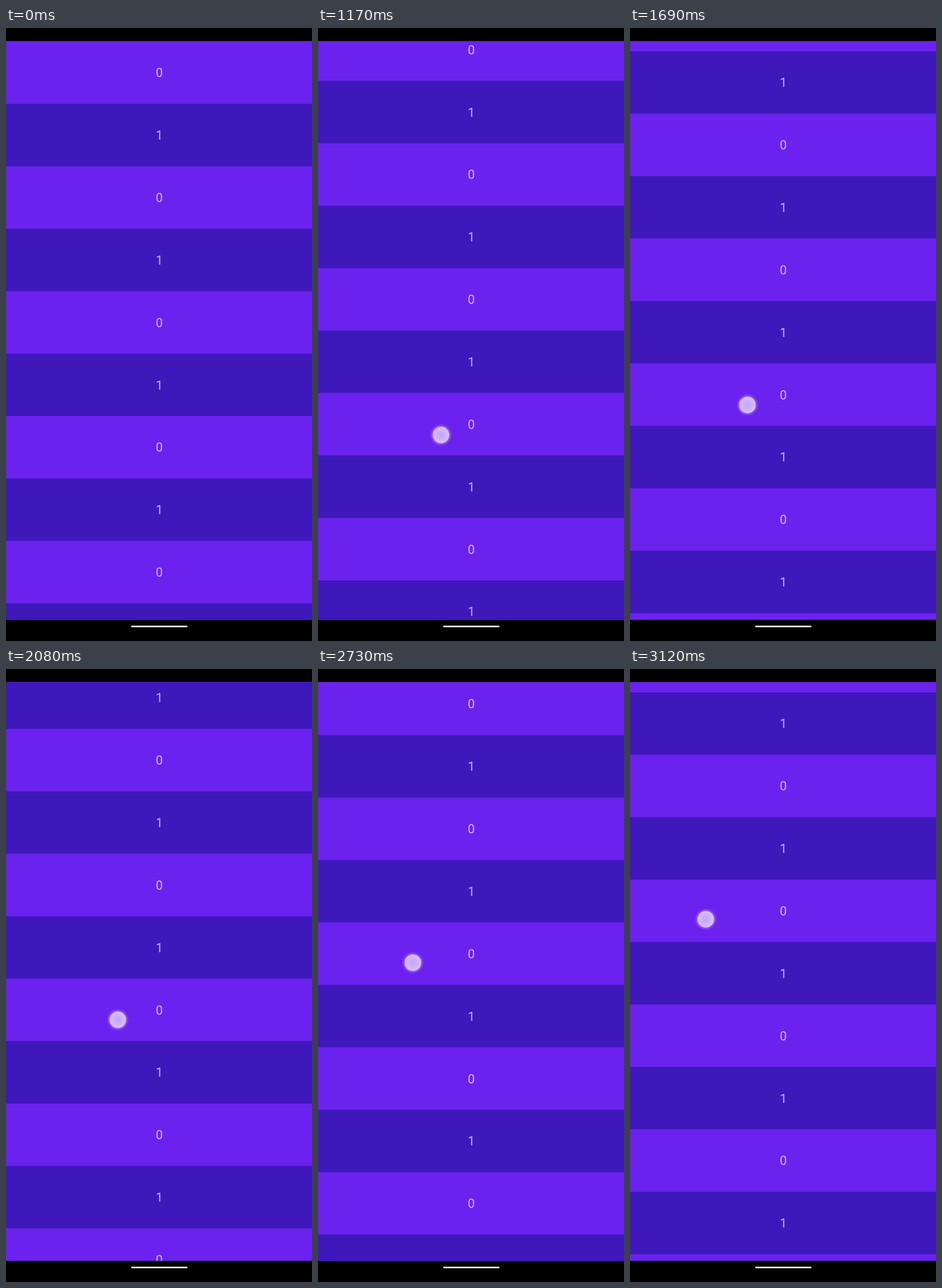
Recreate the animation shown at these times as an HTML page with a canvas. Size 499 by 1000 pixels, loop 3250 ms.

```html
<!DOCTYPE html>
<html lang="en">
<head>
<meta charset="utf-8">
<title>Scrolling list</title>
<style>
  html, body { margin: 0; width: 100%; height: 100%; overflow: hidden; background: #000; }
  canvas { display: block; width: 100%; height: 100%; }
</style>
</head>
<body>
<canvas id="stage" width="499" height="1000"></canvas>
<script>
const ctx = document.getElementById('stage').getContext('2d');
const W = 499, H = 1000;
const DP = 1.2731;
const VIEW_TOP = 21.3, VIEW_BOTTOM = 965.6;
const LIST_TOP = 21.9, ROW = 80 * DP;
const LOOP = 3250, TICK = 130;
const FILLS = ['#6c22ee', '#3e18ba'];

// A slow drag that gathers speed: [time, scroll offset]
const DRAG = [[780, 3.5], [1690, 85.8], [2470, 177.6], [3120, 289.4]];

function speed(i) {
  const a = DRAG[Math.max(i - 1, 0)];
  const b = DRAG[Math.min(i + 1, DRAG.length - 1)];
  return (b[1] - a[1]) / (b[0] - a[0]);
}

// Cubic Hermite curve through the drag points
function scrollAt(t) {
  let i = 0;
  while (i < DRAG.length - 2 && t >= DRAG[i + 1][0]) i++;
  const [t0, s0] = DRAG[i], [t1, s1] = DRAG[i + 1];
  const span = t1 - t0, u = (t - t0) / span, v = 1 - u;
  return v * v * (1 + 2 * u) * s0 + u * u * (3 - 2 * u) * s1
    + span * u * v * (v * speed(i) - u * speed(i + 1));
}

function drawRows(offset) {
  ctx.save();
  ctx.beginPath();
  ctx.rect(0, VIEW_TOP, W, VIEW_BOTTOM - VIEW_TOP);
  ctx.clip();
  ctx.fillStyle = FILLS[0];
  ctx.fillRect(0, 0, W, H);
  ctx.font = `${16 * DP}px Roboto, sans-serif`;
  ctx.textAlign = 'center';
  const first = Math.floor((offset + VIEW_TOP - LIST_TOP) / ROW);
  for (let i = Math.max(first, 0); i < first + 12; i++) {
    const y = LIST_TOP + i * ROW - offset;
    if (i % 2) {
      ctx.fillStyle = FILLS[1];
      ctx.fillRect(0, y, W, ROW);
    }
    ctx.fillStyle = 'rgba(255,240,250,.75)';
    ctx.fillText(i % 2, 250, y + ROW / 2 + 7.5);
  }
  ctx.restore();
}

// The fingertip follows the list and drifts left in a widening curve
function drawFinger(offset) {
  const x = 207 - 0.17 * offset - 1.415e-6 * offset ** 3;
  const y = 702 - 1.015 * offset;
  const glow = ctx.createRadialGradient(x, y, 0, x, y, 18);
  const stop = (r, alpha) => glow.addColorStop(r / 18, `rgba(255,250,255,${alpha})`);
  stop(0, 0.6);
  stop(6, 0.65);
  stop(12.8, 0.73);
  stop(14.2, 0.23);
  stop(18, 0);
  ctx.fillStyle = glow;
  ctx.fillRect(x - 18, y - 18, 36, 36);
}

function drawHomeBar() {
  const w = 72 * DP, h = 2 * DP;
  ctx.fillStyle = '#fff';
  ctx.beginPath();
  ctx.roundRect(250 - w / 2, 974.9, w, h, h / 2);
  ctx.fill();
}

function draw(now) {
  const t = Math.floor((now % LOOP) / TICK) * TICK;
  const touching = t >= DRAG[0][0];
  const offset = touching ? scrollAt(t) : 0;
  ctx.fillStyle = '#000';
  ctx.fillRect(0, 0, W, H);
  drawRows(offset);
  if (touching) drawFinger(offset);
  drawHomeBar();
}

let start = null;
function loop(now) {
  if (start === null) start = now;
  draw(Math.max(0, now - start));
  requestAnimationFrame(loop);
}
draw(0);
requestAnimationFrame(loop);
</script>
</body>
</html>
```
